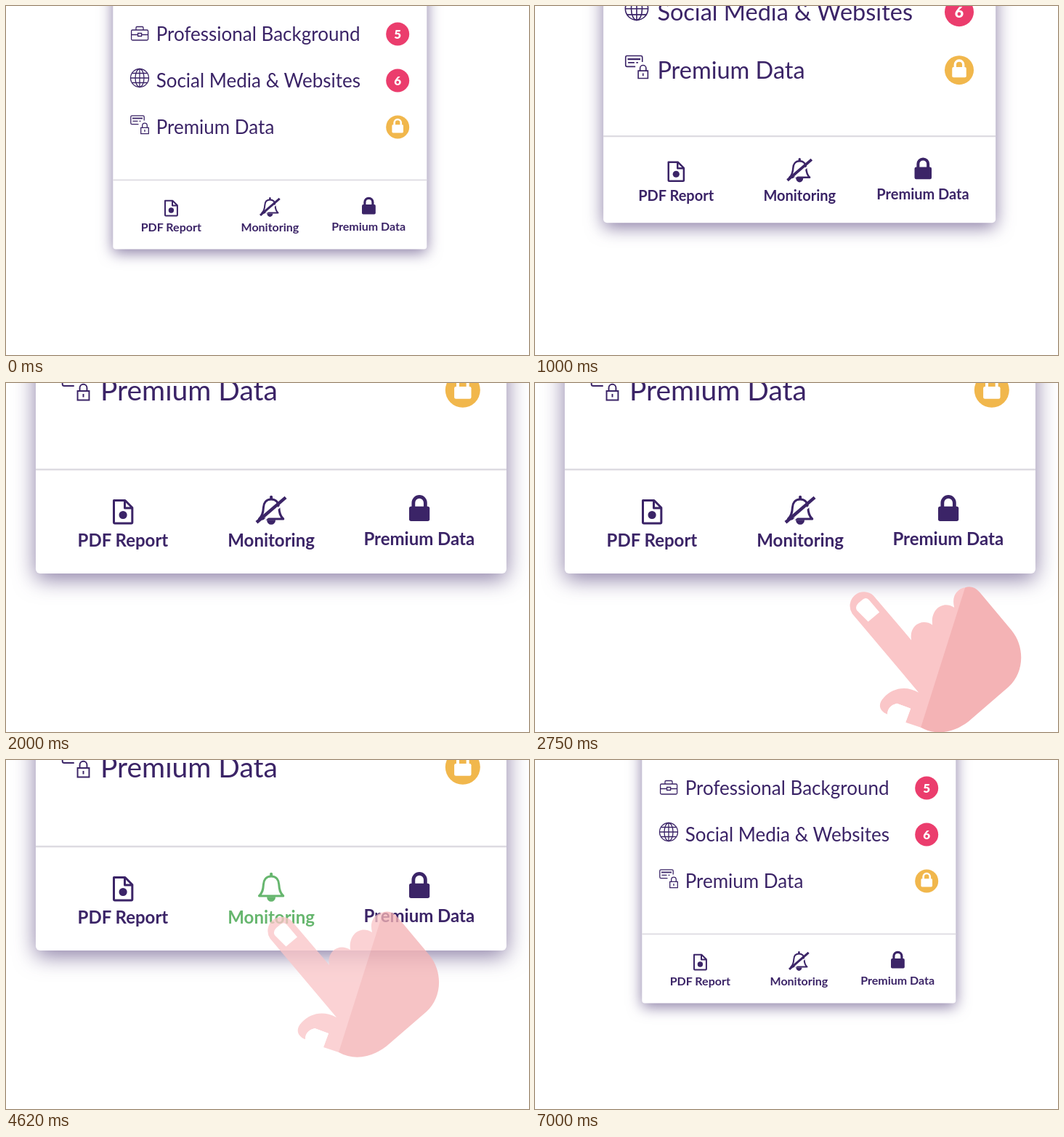
These frames come from a looping animation (720x480 px, 7.12 s). An HTML page:

```html
<!DOCTYPE html>
<html lang="en">
<head>
<meta charset="utf-8">
<title>Turn on monitoring</title>
<style>
  html, body { margin: 0; width: 100%; height: 100%; overflow: hidden; background: #fff; }
  svg { display: block; width: 100vw; height: 100vh; font-family: Lato, sans-serif; }
  #card { fill: #3b2467; }
  .sheet { fill: #fff; filter: drop-shadow(0 5px 10px rgba(59, 36, 103, .6)); }
  .row { font-size: 26px; }
  .label { font-size: 16px; font-weight: 700; text-anchor: middle; }
  .count { font-size: 17px; font-weight: 900; fill: #fff; text-anchor: middle; }
  .thin { fill: none; stroke: #3b2467; stroke-width: 1.3; }
  .line { fill: none; stroke: #3b2467; stroke-width: 2; stroke-linejoin: round; }
  #on { fill: #66b66e; color: #66b66e; }
  #off { color: #3b2467; }
</style>
</head>
<body>
<svg viewBox="0 0 720 480">
  <defs>
    <g id="lock">
      <rect x="-9.4" y="-13.5" width="18.8" height="13.5" rx="1.8" fill="currentColor"/>
      <path d="M-5.5 -13V-16.8a5.5 5.5 0 0 1 11 0V-13" fill="none" stroke="currentColor" stroke-width="3.2"/>
    </g>
    <g id="bell">
      <path d="M363.4 266.6c-5 0-6.9 3.8-7.1 7.4-.3 5-1 7.8-4 10.6h22.2c-3-2.8-3.7-5.6-4-10.6-.2-3.6-2.1-7.4-7.1-7.4z"
        fill="none" stroke="currentColor" stroke-width="2" stroke-linejoin="round"/>
      <path d="M363.4 264.4v1.6" stroke="currentColor" stroke-width="2.6" stroke-linecap="round"/>
      <path d="M359.4 285.5a4 4.4 0 0 0 8 0z" fill="currentColor"/>
    </g>
  </defs>

  <g id="card">
    <rect class="sheet" x="147.3" y="-100" width="432" height="434.6" rx="4"/>
    <path d="M147.3 239.3h432" stroke="#dddbe1" stroke-width="1.7"/>

    <g class="row">
      <text x="206.7" y="48">Professional Background</text>
      <text x="206.7" y="112">Social Media &amp; Websites</text>
      <text x="206.7" y="176">Premium Data</text>
    </g>

    <g class="thin">
      <rect x="172.6" y="33" width="23" height="14" rx="1.5"/>
      <path d="M179 33v-3q0-1.5 1.5-1.5h7q1.5 0 1.5 1.5v3M172.6 39.5h9M186.6 39.5h9M181.6 37.5h5v4h-5z"/>
      <circle cx="184" cy="99" r="12.5"/>
      <ellipse cx="184" cy="99" rx="6" ry="12.5"/>
      <path d="M184 86.500v25M171.500 99h25M173.500 92.500h21M173.500 105.500h21"/>
      <path d="M182.500 162.700H173.500q-1.700 0-1.700-1.700V152.500q0-1.700 1.700-1.700H188.500q1.700 0 1.700 1.700V157.500M174.500 158.300h7M183.500 158.300h2"/>
      <path d="M174 154.500h14" stroke-width="1.800"/>
      <path d="M185.700 167.300h10.600v8.300h-10.600zM187.700 167v-2.500a3.300 3.300 0 0 1 6.600 0v2.500M191 170v3"/>
    </g>

    <g fill="#eb3d6d">
      <circle cx="539.2" cy="38.500" r="16"/>
      <circle cx="539.2" cy="102.500" r="16"/>
      <circle cx="539.2" cy="166.500" r="16" fill="#f1b74c"/>
    </g>
    <text class="count" x="539.2" y="44.700">5</text>
    <text class="count" x="539.2" y="108.700">6</text>
    <use href="#lock" color="#fff" transform="translate(539.2 174.500) scale(.83)"/>

    <rect id="hover" x="206.300" y="248" width="0" height="0"/>
    <rect id="highlight" x="299.500" y="248" width="128" height="78" rx="3" fill="#e8e5ec"/>

    <path class="line" d="M219 267.700h10.300l6.600 6.600V287.600q0 1-1 1H220q-1 0-1-1zM229 268v6.600h6.600"/>
    <circle cx="227.400" cy="281" r="3.700"/>
    <text class="label" x="227.300" y="310">PDF Report</text>

    <g id="off">
      <use href="#bell"/>
      <path d="M352 290.200L378.500 267.300" stroke="#fff" stroke-width="1.600"/>
      <path d="M350 287.800L376.700 264.900" stroke="#3b2467" stroke-width="3"/>
      <text class="label" x="363.400" y="310">Monitoring</text>
    </g>
    <g id="on">
      <use href="#bell"/>
      <text class="label" x="363.400" y="310">Monitoring</text>
    </g>

    <use href="#lock" color="#3b2467" transform="translate(499.400 286.600)"/>
    <text class="label" x="499.200" y="308.500">Premium Data</text>
  </g>

  <g id="hand">
    <path fill="#fac6c8" d="M378.500 267.500A19.300 19.300 0 0 1 408 243L460 304C456 285 474 273 489 283C486 262 503 249 519 259C515 243 523 234 533 231.500L540 240L480 424H473L452 417L459 398L440 391C432 393 427 398 427 406C416 402 413 392 422 383C434 370 452 366 470 376Z"/>
    <path fill="#f4b3b5" d="M473 424L534 231.500Q545 228 554 238L598 290.500C617 314 615 349 594 368L543 412C523 430 496 437 473 424Z"/>
    <path fill="#fff" d="M385 263Q382 258 387 253L393 248Q398 244 402 249L416 265.500L400.500 278.500ZM427 406C427 398 432 393 440 391L459 398L452 417Z"/>
  </g>
</svg>

<script>
const LOOP = 7120, STEP = 125;
const [card, highlight, off, on, hand] =
  ['card', 'highlight', 'off', 'on', 'hand'].map(id => document.getElementById(id));
document.getElementById('hover').remove();

// time, x, y of the hand relative to where it first hovers
const path = [[2125, 114, 98], [2875, 47, 40], [3375, 0, 0], [3625, -10, -18], [3875, -15, -22]];

const clamp = u => Math.max(0, Math.min(1, u));
const ease = u => u < .5 ? 2 * u * u : 1 - 2 * (1 - u) ** 2;
const span = (t, from, to) => ease(clamp((t - from) / (to - from)));

function along(t) {
  const i = Math.max(1, path.findIndex(p => p[0] >= t));
  const a = path[i - 1], b = path[i];
  const u = clamp((t - a[0]) / (b[0] - a[0]));
  return t >= path.at(-1)[0] ? path.at(-1).slice(1) : [1, 2].map(k => a[k] + (b[k] - a[k]) * u);
}

function draw(t) {
  const scale = t < 6000 ? 1 + span(t, 0, 2000) / 2 : 1;
  card.setAttribute('transform', `translate(360 480) scale(${scale}) translate(-360 -480)`);
  card.style.opacity = 1 - span(t, 5500, 6000) + span(t, 6500, 7000);

  const green = t < 6000 ? span(t, 3875, 4250) : 0;
  on.style.opacity = green;
  off.style.opacity = 1 - green;
  highlight.style.opacity = span(t, 3000, 3375) - span(t, 3625, 4000);

  hand.setAttribute('transform', `translate(${along(t)})`);
  hand.style.opacity = span(t, 2125, 2500) - span(t, 4500, 4875);
}

// The picture advances eight times a second.
function tick() {
  const t = performance.now() % LOOP;
  draw(Math.floor((t + 5) / STEP) * STEP);
  requestAnimationFrame(tick);
}
tick();
</script>
</body>
</html>
```
